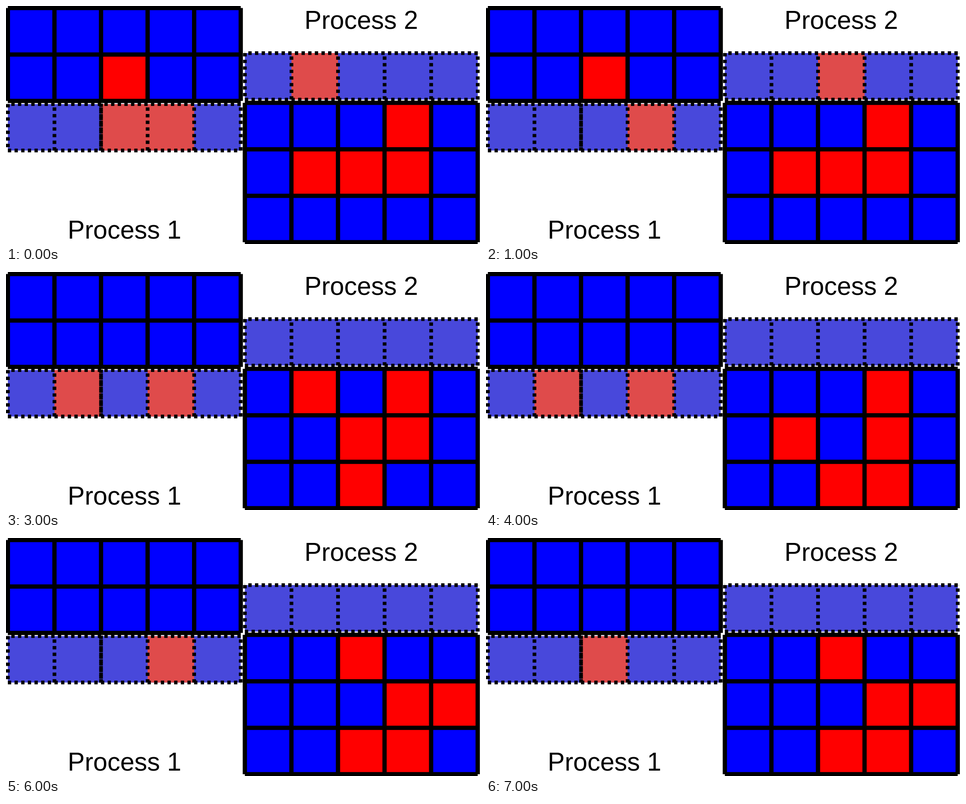
Recreate the animation shown at these times as an HTML page. Size 1055 px wide and 531 px high, loop 8 s.

```html
<!DOCTYPE html>
<html lang="en">
<head>
<meta charset="utf-8">
<title>Two processes</title>
<style>
  html, body { margin: 0; width: 100%; height: 100%; overflow: hidden; background: #fff; }
  svg { display: block; width: 1055px; height: 531px; }
  text { font: 56.9px "Liberation Sans", Arial, sans-serif; }
  .solid { stroke: #000; stroke-width: 9.5; }
  .dotted { stroke: #000; stroke-width: 8.2; stroke-dasharray: 7.4; }
  .live { animation: life 8s step-end infinite; }
  /* one step per second, --s0 to --s7 hold 1 for alive and 0 for dead */
  @keyframes life {
    0% { opacity: var(--s0); }
    12.5% { opacity: var(--s1); }
    25% { opacity: var(--s2); }
    37.5% { opacity: var(--s3); }
    50% { opacity: var(--s4); }
    62.5% { opacity: var(--s5); }
    75% { opacity: var(--s6); }
    87.5%, 100% { opacity: var(--s7); }
  }
</style>
</head>
<body>
<svg id="stage" viewBox="0 0 1055 531">
  <text x="664.2" y="51">Process 2</text>
  <text x="137.2" y="518.5">Process 1</text>
</svg>
<script>
const stage = document.getElementById('stage');
const COLS = 5, SIZE = 103.65;

function add(name, attrs) {
  const el = document.createElementNS('http://www.w3.org/2000/svg', name);
  for (const key in attrs) el.setAttribute(key, attrs[key]);
  return stage.appendChild(el);
}

function line(x1, y1, x2, y2, style) {
  add('line', { x1, y1, x2, y2, class: style });
}

// cells: [column, row, alive state for each second]
function board({ x, y, rows, style, dead, alive, cells }) {
  const width = COLS * SIZE, height = rows * SIZE;
  const right = x + width, bottom = y + height;
  add('rect', { x, y, width, height, fill: dead });
  for (const [col, row, states] of cells) {
    const cell = add('rect', {
      x: x + col * SIZE, y: y + row * SIZE, width: SIZE, height: SIZE, fill: alive, class: 'live'
    });
    [...states].forEach((s, i) => cell.style.setProperty('--s' + i, s));
  }
  // the outline runs counterclockwise, which sets where dashes begin
  line(right, y, x, y, style);
  line(x, y, x, bottom, style);
  for (let r = 1; r <= rows; r++) line(x, y + r * SIZE, right, y + r * SIZE, style);
  for (let c = 1; c <= COLS; c++) line(x + c * SIZE, bottom, x + c * SIZE, y, style);
}

const own = { style: 'solid', dead: '#00f', alive: '#f00' };
const ghost = { style: 'dotted', rows: 1, dead: '#4848db', alive: '#df4b4b' };

const halo = { x: 4.2, y: 218.8 };
board({ ...ghost, ...halo, cells: [
  [1, 0, '00011000'],
  [2, 0, '10000001'],
  [3, 0, '11111110']
] });
// a second dotted line the other way nearly closes the gaps here
const seam = halo.x + 2 * SIZE;
line(seam, halo.y - 1, seam, halo.y + SIZE, 'dotted');

board({ ...ghost, x: 531.7, y: 105.1, cells: [
  [1, 0, '10000000'],
  [2, 0, '01100000']
] });

board({ ...own, x: 4.2, y: 4.5, rows: 2, cells: [
  [2, 1, '11000000']
] });

board({ ...own, x: 531.6, y: 216.1, rows: 3, cells: [
  [1, 0, '00110000'],
  [2, 0, '00000011'],
  [3, 0, '11111100'],
  [1, 1, '11001100'],
  [2, 1, '11110000'],
  [3, 1, '11111111'],
  [4, 1, '00000011'],
  [2, 2, '00111111'],
  [3, 2, '00001111']
] });
</script>
</body>
</html>
```
